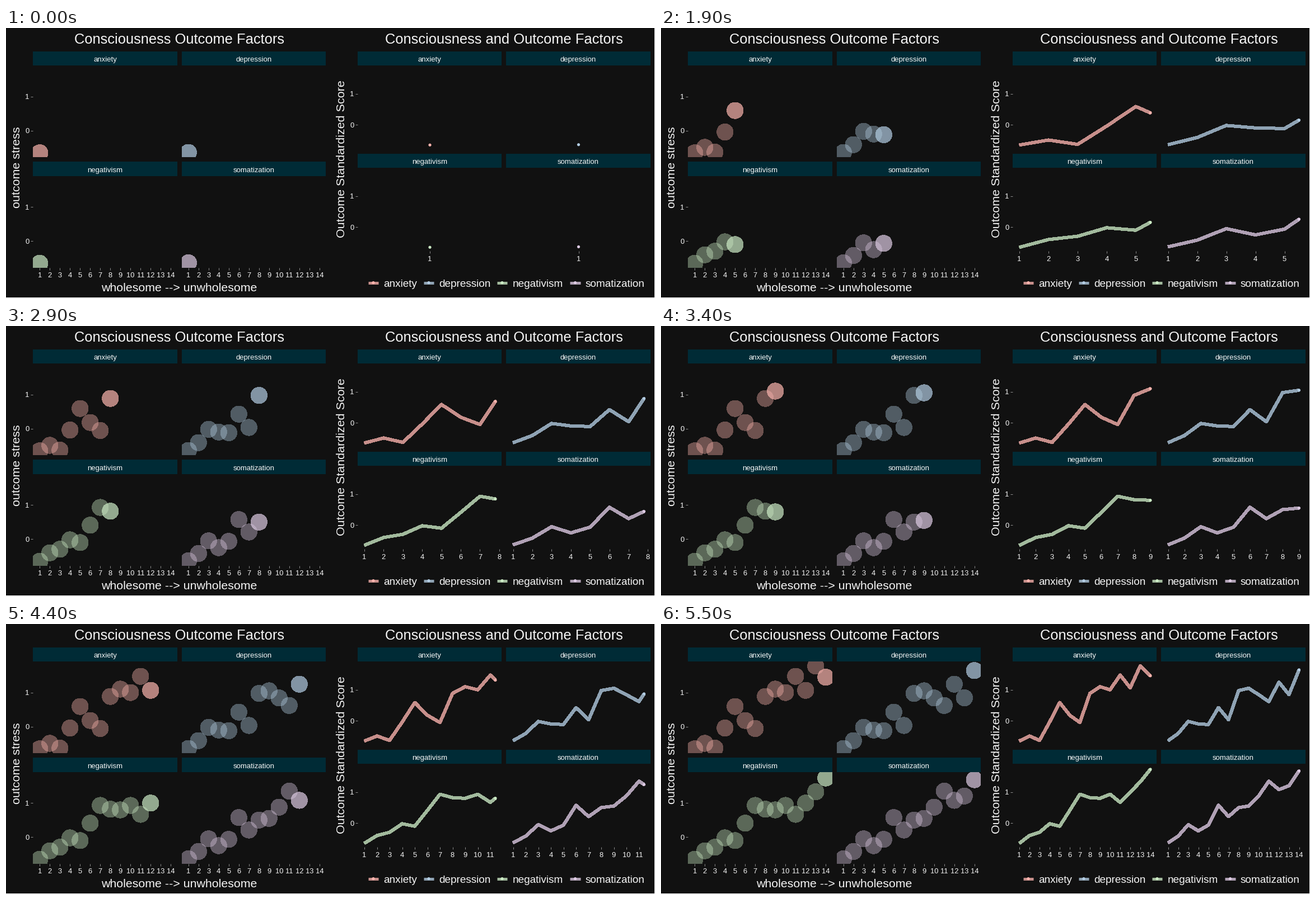
Write a matplotlib script that moves like this. It is 1159 px wide and 483 px high and loops after 5600 ms.

```python
import matplotlib.pyplot as plt
from matplotlib.animation import FuncAnimation
from matplotlib.patches import Circle, Rectangle
import numpy as np

W, H, DPI = 1159, 483, 64
FRAMES, N = 56, 14
PT = 72 / DPI
BG, STRIP, INK, TICK = "#111111", "#002b36", "#f5f5f5", "#8c8c8c"

SERIES = {
    "anxiety": ("#fbb4ae", [-.65, -.49, -.63, -.04, .59, .18, -.055, .885,
                            1.10, 1.00, 1.475, 1.065, 1.775, 1.45]),
    "depression": ("#b3cde3", [-.64, -.41, -.02, -.10, -.12, .425, .035, .975,
                               1.05, .84, .62, 1.245, .845, 1.645]),
    "negativism": ("#ccebc5", [-.65, -.40, -.295, -.02, -.10, .41, .93, .82,
                               .80, .93, .67, 1.00, 1.33, 1.735]),
    "somatization": ("#decbe4", [-.635, -.42, -.05, -.25, -.065, .575, .21, .50,
                                 .55, .88, 1.35, 1.08, 1.205, 1.685]),
}

plt.rcParams["font.family"] = "Liberation Sans"
fig = plt.figure(figsize=(W / DPI, H / DPI), dpi=DPI, facecolor=BG)
ax = fig.add_axes([0, 0, 1, 1])
ax.set_xlim(0, W)
ax.set_ylim(H, 0)
ax.axis("off")


def text(x, y, s, px, ha="center", **kw):
    return ax.text(x, y, s, fontsize=px * PT, color=INK, ha=ha,
                   va="baseline", **kw)


def side_title(x, y, s):
    ax.text(x, y, s, fontsize=21.45 * PT, color=INK, rotation=90,
            rotation_mode="anchor", ha="center", va="baseline")


def line(xs, ys, px, color, **kw):
    kw.setdefault("solid_capstyle", "butt")
    return ax.plot(xs, ys, color=color, lw=px * PT, **kw)[0]


def rect(x, y, w, h, color):
    ax.add_patch(Rectangle((x, y), w, h, fc=color, ec="none"))


def panel(x0, top, name, zero, unit):
    """Strip with its name, plus y ticks on the leftmost column."""
    rect(x0, top, 257.4, 25.6, STRIP)
    text(x0 + 128.7, top + 18.5, name, 13.1)
    if x0 in (48.3, 627.9):
        for v in (0, 1):
            y = zero - v * unit
            line([x0 - 4.3, x0], [y, y], 1, TICK)
            text(x0 - 6.6, y + 4.7, str(v), 13.1, "right")


def dot(x, y, color):
    return ax.add_patch(Circle((x, y), 2.6, fc=color, ec="none", zorder=4))


# Titles
text(310, 27.8, "Consciousness Outcome Factors", 25.5)
text(889.5, 27.8, "Consciousness and Outcome Factors", 25.5)
text(309.7, 470.6, "wholesome --> unwholesome", 21.4)
side_title(25, 249, "outcome stress")
side_title(604.7, 234.3, "Outcome Standardized Score")

bubbles, trails = [], []
for i, (name, (color, vals)) in enumerate(SERIES.items()):
    row, dx = i // 2, 265.5 * (i % 2)
    vals = np.array(vals)

    # Bubble panel
    x0, top, zero = 48.3 + dx, 41.6 + 197.6 * row, 183.6 + 197.7 * row
    panel(x0, top, name, zero, 61)
    clip = Rectangle((x0, top + 25.6), 257.4, 164, transform=ax.transData)
    group = []
    for j, v in enumerate(vals):
        c = Circle((60.3 + dx + 18 * j, zero - 61 * v), 14.6, fc=color,
                   ec="none", antialiased=False, zorder=3)
        ax.add_patch(c)
        c.set_clip_path(clip)
        group.append(c)
    bubbles.append(group)

    # Line panel
    zero = 173.2 + 183 * row
    panel(627.9 + dx, 41.6 + 183.2 * row, name, zero, 55.5)
    curve = line([], [], 5, color, alpha=.78, solid_joinstyle="round",
                 antialiased=False, zorder=3)
    trails.append((640 + dx, zero - 55.5 * vals, curve, dot(0, 0, color)))

# Fixed x axes on the left
for dx in (0, 265.5):
    for j in range(N):
        x = 60.3 + dx + 18 * j
        line([x, x], [429, 433], 1, TICK)
        text(x, 446, str(j + 1), 12.9)

# Rescaling x axes on the right
axis_marks = [(x0, j, line([], [], 1, TICK), text(0, 416.7, str(j + 1), 12.9))
              for x0 in (640, 905.5) for j in range(N)]

# Legend
for name, x in zip(SERIES, (646.7, 745.7, 876.7, 1007.2)):
    color = SERIES[name][0]
    line([x, x + 18.6], [455.6, 455.6], 5, color, alpha=.78)
    dot(x + 9.3, 455.6, color)
    text(x + 27.8, 462.6, name, 19, "left")

# Pale right and bottom edges
rect(W - 1, 0, 1, H, "#ffffff")
rect(0, H - 1, W, 1, "#ffffff")

STEPS = np.arange(N)
KEYS = np.round(STEPS * (FRAMES - 1) / (N - 1))


def update(k):
    now = k // 4
    for group in bubbles:
        for j, c in enumerate(group):
            c.set_visible(j <= now)
            c.set_alpha(.7 if j == now else .4)

    pos = np.interp(k, KEYS, STEPS)
    scale = 234 / pos if pos else 0
    start = 0 if pos else 117

    for x0, ys, curve, head in trails:
        done = STEPS[STEPS < pos]
        xs = x0 + start + scale * np.append(done, pos)
        end = np.interp(pos, STEPS, ys)
        curve.set_data(xs, np.append(ys[done], end))
        head.center = xs[-1], end

    for x0, j, tick, label in axis_marks:
        x = x0 + start + scale * j
        shown = j <= pos * 1.05
        tick.set_data([x, x], [399, 403])
        label.set_x(x)
        tick.set_visible(shown)
        label.set_visible(shown)
    return []


anim = FuncAnimation(fig, update, frames=FRAMES, interval=100, repeat=True,
                     repeat_delay=0, init_func=lambda: update(0))
plt.show()
```
